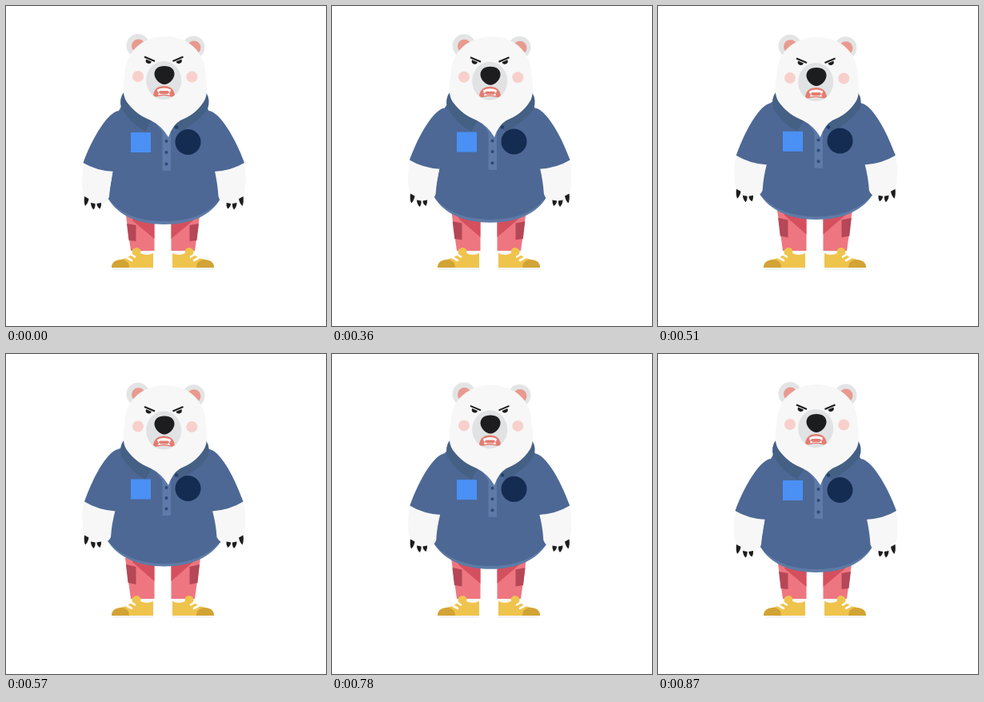
Animation, 400 px wide and 400 px high, one loop 1800 ms. Source, as an HTML page:

```html
<!DOCTYPE html>
<html lang="en">
<head>
<meta charset="utf-8">
<title>Breathing bear</title>
<style>
  html, body { margin: 0; width: 100%; height: 100%; overflow: hidden; background: #fff; }
  svg { display: block; width: 100%; height: 100%; }
</style>
</head>
<body>
<!-- In data-d, "a~b" is a coordinate going from a (breath out) to b (breath in).
     data-dy is the vertical travel of a rigid part. -->
<svg viewBox="0 0 400 400">
  <g id="leg">
    <path fill="#ee7680" data-d="M149 255 L156 306 H185.5 V255Z"/>
    <path fill="#d4505f" data-d="M158 268~260 L185.5 291~284 V255 H160Z"/>
    <path fill="#b54757" data-d="M151~150 272~263 L162.5 274~266 V294~288 L153.5~152.5 293~286Z"/>
    <path fill="#f8f8f8" d="M167 306H184V312H167Z"/>
    <path fill="#f4f4f4" d="M132 326H184V330H134Z"/>
    <path fill="#efc44d" d="M132 327Q132 318 143 317Q153 315 158 310Q156 303 163 302Q170 303 168 309Q176 313 184 309V327Z"/>
    <path fill="#d2a335" d="M132 327Q132 317 146 317Q154 319 154 327Z"/>
    <path stroke="#fff" stroke-width="2.6" stroke-linecap="round" d="M149 313.5L157 318M154 309L161 313.5"/>
  </g>
  <use href="#leg" transform="matrix(-1 0 0 1 392 0)"/>

  <path fill="#5d7ba6" data-d="M134~136 205~196 L128~126 241~232 C140~139 262~254 165 273~265.5 198 273~265.5 S256~257 262~254 268~270 241~232 L262~260 205~196Z"/>
  <path fill="#4d6895" data-d="M134~136 205~196 L128~126 241~232 C142~141 259~251 165 269~262 198 269~262 S254~255 259~251 268~270 241~232 L262~260 205~196Z"/>

  <g id="arm">
    <path fill="#f7f7f7" data-d="M98 193~183 C94 210~200 94~95 225~216 97.5 238~228 C101 247~236 111 250~238 122 247~236 Q127~128 245~235 129~131 238~229 Q130~132 222~212 134~137 204~194Z"/>
    <path fill="#1d1d1f" data-dy="-11.5" d="M98 238L103.500 241Q102.500 247 99 250Q97 245 98 238ZM106 246L111.500 247Q112 252 109.500 254.500Q106 251 106 246ZM113.500 247L119 246Q119.500 250 117.500 253.500Q113.500 251 113.500 247Z"/>
    <path fill="#4d6895" data-d="M150 115 L141~140 131~119 C128 132~122 108~112 164~146 96.500~98 196~184.500 Q113~115 206~195 135~137 207~196.500 L150 225~215 H200 V115Z"/>
  </g>
  <use href="#arm" transform="matrix(-1 0 0 1 394.500 0)"/>

  <path fill="#5d7aa8" data-d="M185 143 H206 V206~202 H195.500 V158Z"/>
  <g fill="#2d4a7c">
    <circle data-dy="-2" cx="200.500" cy="169" r="2"/>
    <circle data-dy="-3" cx="200.500" cy="183" r="2"/>
    <circle data-dy="-4" cx="200.500" cy="197.500" r="2"/>
  </g>
  <g fill="#446084">
    <path d="M147 108Q141 116 144 128Q156 147 174 157L184 140Z"/>
    <path d="M250 108Q256 117 252 129Q238 147 217 157L205 146Z"/>
  </g>
  <circle fill="#20406f" cx="213" cy="151.500" r="2.200"/>
  <rect fill="#4a90f5" data-dy="-1.500" x="156" y="158" width="25" height="25"/>
  <circle fill="#142c52" data-dy="-2" cx="227.500" cy="170" r="16"/>

  <g data-dy=".8">
    <g fill="#e3e4e5"><circle cx="165" cy="49.500" r="14.500"/><circle cx="234.500" cy="51.500" r="14"/></g>
    <g fill="#e99a8f"><circle cx="165.500" cy="50" r="8.500"/><circle cx="235" cy="52" r="8.500"/></g>
  </g>
  <path fill="#f7f7f7" data-d="M199 38~39.200 C171 38~39.200 148.500 57 148.500 87 C146 97 145 111 151 120 C160 132 169 138 181 143 Q195 150 203 164 Q208 149 218 143 C230 138 239 132 247 120 C253 111 251 97 249.500 87 C249.500 57 227 38~39.200 199 38~39.200Z"/>

  <g data-dy="2.500">
    <ellipse fill="#e1e2e3" cx="197.200" cy="93" rx="22" ry="24"/>
    <path fill="#1d1d1f" d="M198 75C206 75 210.500 79 210.500 85C210.500 91 204 98 198 98S185.500 91 185.500 85C185.500 79 190 75 198 75Z"/>
    <path fill="#e37d72" d="M184 111Q186 100 197.500 100Q209 100 211 111Q209 114.500 205 113Q197 111 190 113Q185 114.500 184 111Z"/>
    <path fill="#fff" d="M189 104.500Q197.500 100.500 206 104.500L205 108.500L202.500 106H192.500L190 108.500ZM190 111.500L191 108.500L193.500 110H202L204 108.500L205 111.500Q197.500 109.500 190 111.500Z"/>
    <g fill="#f8d0cb"><circle cx="165" cy="88" r="7"/><circle cx="232.300" cy="88.500" r="7"/></g>
    <g id="eye">
      <path fill="#1d1d1f" d="M175 66.500L182 69.500A3.500 3.500 0 1 1 175 67Z"/>
      <path stroke="#1d1d1f" stroke-width="2" d="M173 63.500L186 69"/>
    </g>
    <use href="#eye" transform="matrix(-1 0 0 1 394.500 0)"/>
  </g>
</svg>
<script>
  const LOOP = 1800, STEP = 30;
  const shapes = [...document.querySelectorAll('[data-d]')];
  const movers = [...document.querySelectorAll('[data-dy]')];

  // Fraction of a stepped move that begins at start and takes count steps
  const progress = (t, start, count) =>
    Math.min(count, Math.max(0, Math.floor((t - start) / STEP) + 1)) / count;

  const breath = t => progress(t, 300, 10) - progress(t, 720, 6) ** 1.2;

  function draw() {
    const k = breath(performance.now() % LOOP);
    for (const el of shapes) {
      el.setAttribute('d', el.dataset.d.replace(/([\d.]+)~([\d.]+)/g,
        (_, a, b) => +a + (b - a) * k));
    }
    for (const el of movers) {
      el.setAttribute('transform', `translate(0 ${el.dataset.dy * k})`);
    }
    requestAnimationFrame(draw);
  }
  draw();
</script>
</body>
</html>
```
